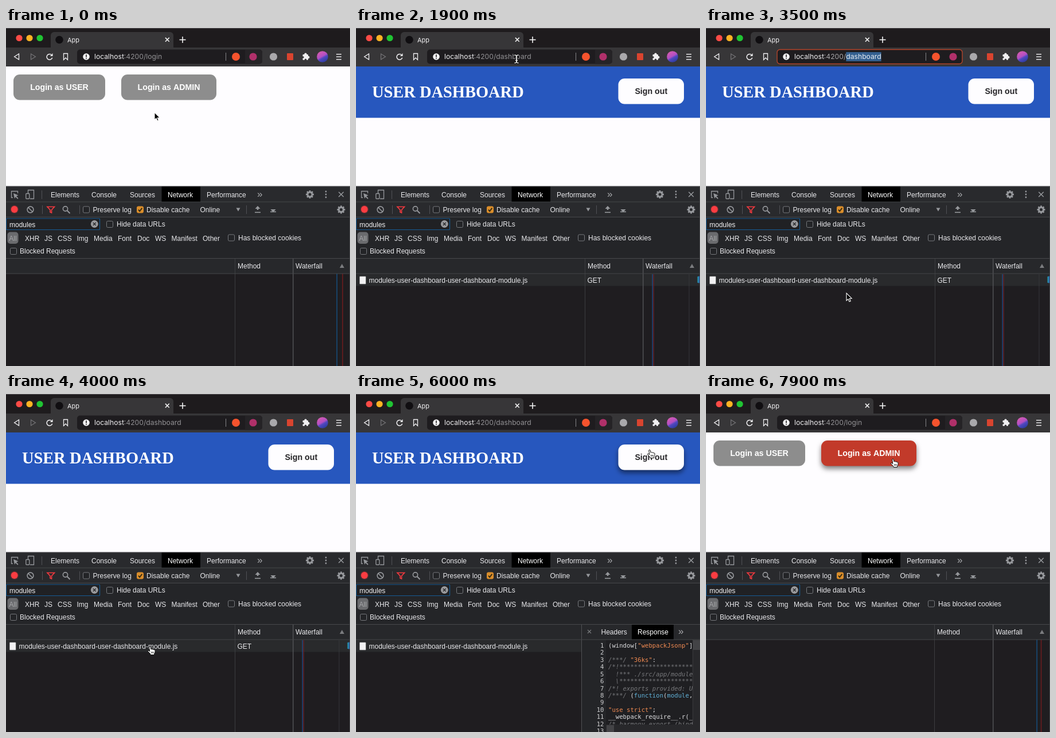
Write an HTML page with a canvas that moves like this. It is 600 px wide and 589 px high and loops after 8 s.

```html
<!DOCTYPE html>
<html lang="en">
<head>
<meta charset="utf-8">
<title>Lazy loading demo</title>
<style>
html, body { margin: 0; width: 100%; height: 100%; overflow: hidden; background: #202124; }
canvas { display: block; }
</style>
</head>
<body>
<canvas id="stage" width="600" height="589"></canvas>
<script>
const c = document.getElementById('stage').getContext('2d');
const LOOP = 8000, STEP = 100;
const SANS = '"Liberation Sans", Arial, sans-serif';
const SERIF = '"Liberation Serif", Times, serif';
const UI = 'Inter, sans-serif';
const MONO = '"DejaVu Sans Mono", monospace';
const INK = '#e9e9ec', ICON = '#96989c', EDGE = '#47484b', BLUE = '#2757be';

// Times at which the state changes
const T = { hoverUser: 700, dash: 1200, focus: 2300, blur: 4000, open: 4100, unselect: 5200,
  hoverOut: 5400, load: 6800, login: 7200, bars: 7300, hoverAdmin: 7600 };

// Pointer path: time, x, y
const PATH = [[0, 259, 147], [200, 256, 145], [800, 112, 106], [1400, 114, 106], [1900, 280, 54],
  [2200, 284, 51], [2700, 284, 51], [3400, 245, 459], [3500, 245, 462], [3900, 251, 440],
  [4700, 251, 439], [4900, 258, 432], [5600, 508, 101], [6000, 512, 97], [6500, 510, 102],
  [7000, 470, 105], [7100, 468, 105], [7600, 340, 112], [7900, 326, 113], [8000, 326, 113]];

function pointerAt(t) {
  let i = 0;
  while (i < PATH.length - 2 && t >= PATH[i + 1][0]) i++;
  const a = PATH[i], b = PATH[i + 1];
  const u = (t - a[0]) / (b[0] - a[0]), e = u * u * (3 - 2 * u);
  return [a[1] + (b[1] - a[1]) * e, a[2] + (b[2] - a[2]) * e];
}

function rect(x, y, w, h, fill) { c.fillStyle = fill; c.fillRect(x, y, w, h); }
function round(x, y, w, h, r, fill, stroke, lw = 1) {
  c.beginPath();
  c.roundRect(x, y, w, h, r);
  if (fill) { c.fillStyle = fill; c.fill(); }
  if (stroke) { c.strokeStyle = stroke; c.lineWidth = lw; c.stroke(); }
}
function disc(x, y, r, fill) {
  c.beginPath(); c.arc(x, y, r, 0, 7);
  c.fillStyle = fill; c.fill();
}
function ring(x, y, r, color, lw, from = 0, to = Math.PI * 2) {
  c.beginPath(); c.arc(x, y, r, from, to);
  c.strokeStyle = color; c.lineWidth = lw; c.stroke();
}
function line(color, lw, ...p) {
  c.beginPath();
  for (let i = 0; i < p.length; i += 2) c.lineTo(p[i], p[i + 1]);
  c.strokeStyle = color; c.lineWidth = lw; c.stroke();
}
function poly(fill, stroke, lw, ...p) {
  c.beginPath();
  for (let i = 0; i < p.length; i += 2) c.lineTo(p[i], p[i + 1]);
  c.closePath();
  if (fill) { c.fillStyle = fill; c.fill(); }
  if (stroke) { c.strokeStyle = stroke; c.lineWidth = lw; c.stroke(); }
}
function text(s, x, y, color = INK, font = '12px ' + SANS, align = 'left') {
  c.font = font; c.textAlign = align; c.fillStyle = color;
  c.fillText(s, x, y);
  return x + c.measureText(s).width;
}
function cross(x, y, r, color, lw) {
  line(color, lw, x - r, y - r, x + r, y + r);
  line(color, lw, x + r, y - r, x - r, y + r);
}

function browser(t, onLogin, loading) {
  rect(0, 0, 600, 34, '#1e1b1d');
  rect(0, 0, 600, 1, '#555356');
  ['#fd4b46', '#fdb223', '#20c433'].forEach((col, i) => disc(23 + 18 * i, 17.5, 5.6, col));
  round(78, 7, 214, 30, [6, 6, 0, 0], '#373638');
  rect(0, 34, 600, 33, '#373638');
  if (loading) {
    disc(93, 20.5, 4.5, '#100e11');
    const a = t / 160 + 2.6;
    ring(93, 20.5, 6, '#d9614e', 1.4, a, a + 4);
  } else disc(93, 20.5, 6.8, '#100e11');
  text('App', 107, 24.5, '#f2f1f3', '11px ' + UI);
  cross(281.3, 20.3, 3.4, '#f4f4f4', 1.5);
  line('#f4f4f4', 1.6, 302.5, 20.5, 313.5, 20.5);
  line('#f4f4f4', 1.6, 308, 15, 308, 26);

  const W = '#f0eff1';
  poly(null, W, 1.3, 14.5, 50, 22.5, 45, 22.5, 55);
  poly(null, '#767578', 1.2, 51.5, 50, 43.5, 45, 43.5, 55);
  if (loading) cross(76, 50, 5, W, 1.5);
  else {
    ring(76, 50.3, 4.9, W, 1.5, 0.3, 5.4);
    poly(W, null, 0, 81.5, 44, 81.5, 49, 76.8, 49);
  }
  poly(null, W, 1.3, 100.5, 44.5, 107.5, 44.5, 107.5, 55.5, 104, 52, 100.5, 55.5);

  const focus = t >= T.focus && t < T.blur;
  round(124, 37.5, 323, 25, 5, '#1e1c1f', focus ? '#b3442b' : null, 1.4);
  if (!focus) round(417, 38, 30, 24.5, [0, 5, 5, 0], '#252326');
  disc(140, 50, 5.8, '#f4f3f5');
  rect(139.2, 46.3, 1.6, 4.5, '#1e1c1f');
  rect(139.2, 52, 1.6, 1.7, '#1e1c1f');
  const uf = '12.15px ' + UI, dim = focus ? '#a7a6a9' : '#929194';
  let x = text('localhost', 154, 54.3, '#f0eff1', uf);
  x = text(':4200/', x, 54.3, dim, uf);
  const page = onLogin ? 'login' : 'dashboard';
  if (focus) {
    c.font = uf;
    rect(x, 42, c.measureText(page).width, 16, '#335f8f');
  }
  text(page, x, 54.3, focus ? '#e8edf3' : dim, uf);
  rect(383, 43, 1, 14, '#858487');
  disc(401, 50, 7, '#f5532d');
  disc(431, 50, 6.6, '#b0306a');

  disc(466.5, 50, 6.6, '#aaa9ac');
  round(490, 44, 11, 12, 1, '#d9442f');
  round(517.5, 46, 9.5, 9.8, 1, W);
  disc(522.5, 45.8, 2.2, W);
  disc(527.3, 51, 2.2, W);
  disc(518, 51, 1.7, '#373638');
  disc(522.5, 55.3, 1.7, '#373638');
  const g = c.createLinearGradient(546, 41, 557, 60);
  g.addColorStop(0, '#d65cae');
  g.addColorStop(0.45, '#b44fc4');
  g.addColorStop(0.6, '#5148c0');
  g.addColorStop(1, '#263a9c');
  disc(552, 50, 9.8, g);
  for (const y of [45, 49.5, 54]) rect(576, y, 9, 1.4, W);
}

function button(label, x, y, w, fill, color, hover) {
  c.save();
  if (hover) {
    c.shadowColor = 'rgba(0,0,0,.5)';
    c.shadowBlur = 8;
    c.shadowOffsetY = 5;
  }
  round(x, y, w, 44.5, 11, fill);
  c.restore();
  text(label, x + w / 2, y + 27, color, 'bold 14.2px ' + SANS, 'center');
}

function page(t, onLogin) {
  rect(0, 67, 600, 209, '#fefdff');
  if (onLogin) {
    const user = t >= T.hoverUser && t < T.dash, admin = t >= T.hoverAdmin;
    button('Login as USER', 13, 81, 160, user ? BLUE : '#8d8d8d', '#fff', user);
    button('Login as ADMIN', 201, 81, 166, admin ? '#c23a2a' : '#8d8d8d', '#fff', admin);
  } else {
    rect(0, 67, 600, 89.5, BLUE);
    text('USER DASHBOARD', 28, 121, '#fff', 'bold 28.45px ' + SERIF);
    button('Sign out', 457.5, 88, 114.5, '#fefdff', '#252427', t >= T.hoverOut);
  }
}

function gear(x, y) {
  for (let i = 0; i < 8; i++) {
    const a = i * Math.PI / 4, u = Math.cos(a), v = Math.sin(a);
    line(ICON, 2.8, x + u * 4, y + v * 4, x + u * 7, y + v * 7);
  }
  ring(x, y, 4, ICON, 3);
}
function check(x, y, label, lx, on) {
  round(x + 0.5, y + 0.5, 11, 11, 2, on ? '#d98d2b' : '#232427', on ? '#d98d2b' : '#77797d');
  if (on) line('#2b2410', 1.8, x + 3, y + 6.2, x + 5.2, y + 8.8, x + 9.3, y + 3.2);
  text(label, lx, y + 10);
}
function arrowIcon(x, y, dir) {
  line(ICON, 2.6, x, y - 4 * dir, x, y + 1);
  poly(ICON, null, 0, x - 4.5, y - dir, x + 4.5, y - dir, x, y - 6 * dir);
  rect(x - 5, y + 4.5, 10, 1.6, ICON);
}

function toolbar() {
  rect(0, 275.5, 600, 314, '#242528');
  rect(0, 275.5, 600, 1, '#8b8b8e');
  rect(0, 276.5, 600, 53, '#292a2d');
  rect(0, 302.5, 600, 1, EDGE);
  rect(0, 329, 600, 1, EDGE);
  rect(271.5, 276.5, 67.5, 26, '#000');
  const tabs = { Elements: 78, Console: 149, Sources: 216, Network: 282, Performance: 350 };
  for (const k in tabs) text(k, tabs[k], 294.5, k === 'Network' ? '#fff' : INK);
  text('»', 438, 295, '#aaabae', '17px ' + SANS);

  line(ICON, 1.3, 12, 295.5, 9.5, 295.5, 9.5, 284.5, 20.5, 284.5, 20.5, 288);
  poly(ICON, null, 0, 13, 288, 21.5, 291.5, 18, 293, 21.5, 296.8, 20.2, 298, 16.6, 294.2, 15, 297.5);
  line(ICON, 1.3, 38.5, 288, 38.5, 282.5, 48.5, 282.5, 48.5, 297.5, 42, 297.5);
  round(34.8, 288.5, 6, 9, 1, null, ICON, 1.3);
  gear(530, 290);
  for (const y of [285, 290, 295]) disc(558, y, 1.4, ICON);
  cross(584.5, 290, 4.3, ICON, 1.5);
  for (const [x, y] of [[62, 283], [63, 309], [128, 309], [419, 309]]) rect(x, y, 1, 15, '#505155');

  disc(14.7, 316, 7.3, '#5a2c30');
  disc(14.7, 316, 5.9, '#fb3d42');
  ring(42.5, 316.5, 5.4, ICON, 1.6);
  line(ICON, 1.6, 38.8, 312.8, 46.2, 320.2);
  poly(null, '#f4393f', 1.7, 72, 311.5, 84.5, 311.5, 79.5, 317, 79.5, 322, 77, 321, 77, 317);
  ring(103.5, 315, 4.1, ICON, 1.6);
  line(ICON, 2, 106.5, 318, 111.5, 323);
  check(134, 310.5, 'Preserve log', 151.5);
  check(228, 310.5, 'Disable cache', 245, true);
  text('Online', 338.5, 320.5);
  poly(ICON, null, 0, 401.5, 313.5, 408.5, 313.5, 405, 319.5);
  arrowIcon(439, 316, 1);
  arrowIcon(466, 315, -1);
  gear(584.5, 316.5);

  round(0.5, 332, 163, 19.5, 1, '#202124', '#175b94', 1.2);
  text('modules', 6, 346.5, '#f3f3f4');
  disc(154.3, 341.5, 6.4, '#9a9b9e');
  cross(154.3, 341.5, 2.5, '#2b2c2f', 1.4);
  check(175, 336, 'Hide data URLs', 193);
  round(2.5, 355.5, 19, 20.5, 5, '#6a6b6e');
  text('All', 12, 370.5, '#a7a8ab', '12px ' + SANS, 'center');
  const kinds = { XHR: 33, JS: 67, CSS: 90, Img: 123.5, Media: 153, Font: 195, Doc: 229, WS: 260,
    Manifest: 288.5, Other: 343 };
  for (const k in kinds) text(k, kinds[k], 370.5);
  check(387, 359.5, 'Has blocked cookies', 405);
  check(7, 383, 'Blocked Requests', 24);
}

function code() {
  const rows = [
    'w(window[|s"webpackJsonp"|w]', '', 'c/***/ |s"36ks"|w:', 'c/*!' + '*'.repeat(24),
    'c  !*** ./src/app/modules', 'c  \\' + '*'.repeat(24), 'c/*! exports provided: Us',
    'c/***/ |w(|kfunction|w(|kmodule|w, ', '', 's"use strict"|w;',
    'w__webpack_require__.r(__', 'c/* harmony export (bindi', ''];
  const tint = { w: '#dedee0', s: '#f08a52', c: '#77787b', k: '#62b3da' };
  const size = '10.65px ' + MONO;
  c.save();
  c.beginPath(); c.rect(394, 428, 206, 161); c.clip();
  rows.forEach((row, i) => {
    const y = 442 + i * 12.42;
    text(i + 1, 432.5, y, '#d0d0d2', size, 'right');
    let x = 440;
    if (row) for (const part of row.split('|')) {
      const k = part[0];
      x = text(part.slice(1), x, y, tint[k], (k === 'c' ? 'italic ' : '') + size);
    }
  });
  rect(587, 428, 13, 161, '#28282b');
  rect(587, 428, 1, 161, '#3a3a3d');
  rect(588, 429, 12, 17, '#434346');
  rect(436, 576, 152, 13, '#28282b');
  rect(437, 577, 13, 12, '#434346');
  c.restore();
}

function table(t, onLogin, loading) {
  const panel = t >= T.open && t < T.load;
  const row = !onLogin && !loading;
  const selected = panel && t < T.unselect;
  const split = t < T.load ? 399 : 398;
  rect(0, 401, 600, 27, '#27282b');
  rect(0, 428, 600, 161, '#1f1d20');
  if (row) {
    rect(0, 428.5, 600, 21, selected ? '#11528c' : '#292a2c');
    round(6.5, 433, 10.5, 13, 0.5, '#f2f2f3', '#b8b9bb', 0.6);
    text('modules-user-dashboard-user-dashboard-module.js', 22.5, 443.5, selected ? '#d0dbe7' : INK);
  }
  if (panel) {
    rect(393, 401, 207, 27, '#27282b');
    rect(393, 428, 207, 161, '#1f1f22');
    rect(394, 428, 42, 161, '#242528');
    rect(481, 402, 73, 26, '#000');
    cross(407, 414, 3, '#77797c', 1.2);
    text('Headers', 427.5, 418.5);
    text('Response', 491, 418.5, '#fff');
    text('»', 562, 419, '#aaabae', '17px ' + SANS);
    code();
    rect(393, 401, 1, 188, '#505154');
  } else {
    text('Method', split + 5, 418.5);
    text('Waterfall', 505, 418.5);
    poly('#7b7c7f', null, 0, 582, 418, 590, 418, 586, 411);
    rect(split, 401, 1, 188, '#3c3d40');
    rect(500, 401, 1.5, 188, '#505154');
    if (row) {
      text('GET', 403.5, 443.5);
      rect(516.5, 429, 1.3, 160, '#1d4f8c');
      rect(518.5, 429, 1.3, 160, '#6c2024');
      rect(580.5, 429, 1, 160, '#36373a');
      rect(595.5, 433, 2, 11, '#2596a5');
      rect(597.5, 432.5, 2.5, 12, '#2e7bd3');
    } else if (loading) {
      rect(567, 428, 1, 161, '#36373a');
    } else if (t < T.dash || t >= T.bars) {
      rect(576.5, 428, 1.4, 161, '#165383');
      rect(t < T.dash ? 586.3 : 583.8, 428, 1.6, 161, '#6b1d1f');
    }
  }
  rect(0, 401, 600, 1, EDGE);
  rect(0, 427.5, 600, 1, EDGE);
  if (!panel) rect(599, 276, 1, 313, '#414245');
}

function arrow(x, y) {
  poly('#000', '#fff', 1.1, x, y, x, y + 13, x + 3, y + 10.3, x + 5, y + 14.8,
    x + 7.2, y + 13.9, x + 5.2, y + 9.5, x + 9.2, y + 9.3);
}
function beam(x, y) {
  for (const [col, lw] of [['#111', 3], ['#f4f4f4', 1.3]]) {
    line(col, lw, x - 3.5, y - 7, x - 1, y - 6.5, x, y - 5, x, y + 5, x - 1, y + 6.5, x - 3.5, y + 7);
    line(col, lw, x + 3.5, y - 7, x + 1, y - 6.5, x, y - 5, x, y + 5, x + 1, y + 6.5, x + 3.5, y + 7);
    line(col, lw, x - 2, y + 2.5, x + 2, y + 2.5);
  }
}
function hand(x, y) {
  c.save();
  c.translate(x, y);
  c.lineJoin = 'round';
  poly('#fff', '#111', 1, -1.3, 1, 0, 0, 1.2, 1, 2, 5, 3.6, 4.2, 4.7, 5.3, 6.2, 4.8, 7.2, 6,
    8.4, 5.8, 9.2, 7, 8.8, 10.5, 7.6, 12.5, 7.6, 14.5, 1.2, 14.5, 0.6, 12.6, -3.5, 8.6,
    -3.2, 7.2, -1.8, 7.2, -0.2, 8.8);
  for (const i of [2.6, 4.4, 6.2]) line('#111', 0.8, i, 9, i, 12);
  c.restore();
}

function pointer(t, onLogin, loading) {
  const [x, y] = pointerAt(t);
  const overLink = onLogin ? (t >= T.hoverUser && t < T.dash) || t >= T.hoverAdmin
    : t < T.hoverUser + 800 || (t >= T.hoverOut && !loading);
  if (y > 37 && y < 63 && x > 150 && x < 383) beam(x, y);
  else if (overLink || (y > 428 && y < 450)) hand(x, y);
  else arrow(x, y);
}

function draw(now) {
  const t = Math.floor((now % LOOP) / STEP) * STEP;
  const onLogin = t < T.dash || t >= T.login;
  const loading = t >= T.load && t < T.login;
  c.clearRect(0, 0, 600, 589);
  browser(t, onLogin || loading, loading);
  page(t, onLogin);
  toolbar();
  table(t, onLogin, loading);
  pointer(t, onLogin, loading);
}

let start;
function tick(now) {
  start ??= now;
  draw(now - start);
  requestAnimationFrame(tick);
}
draw(0);
requestAnimationFrame(tick);
</script>
</body>
</html>
```
